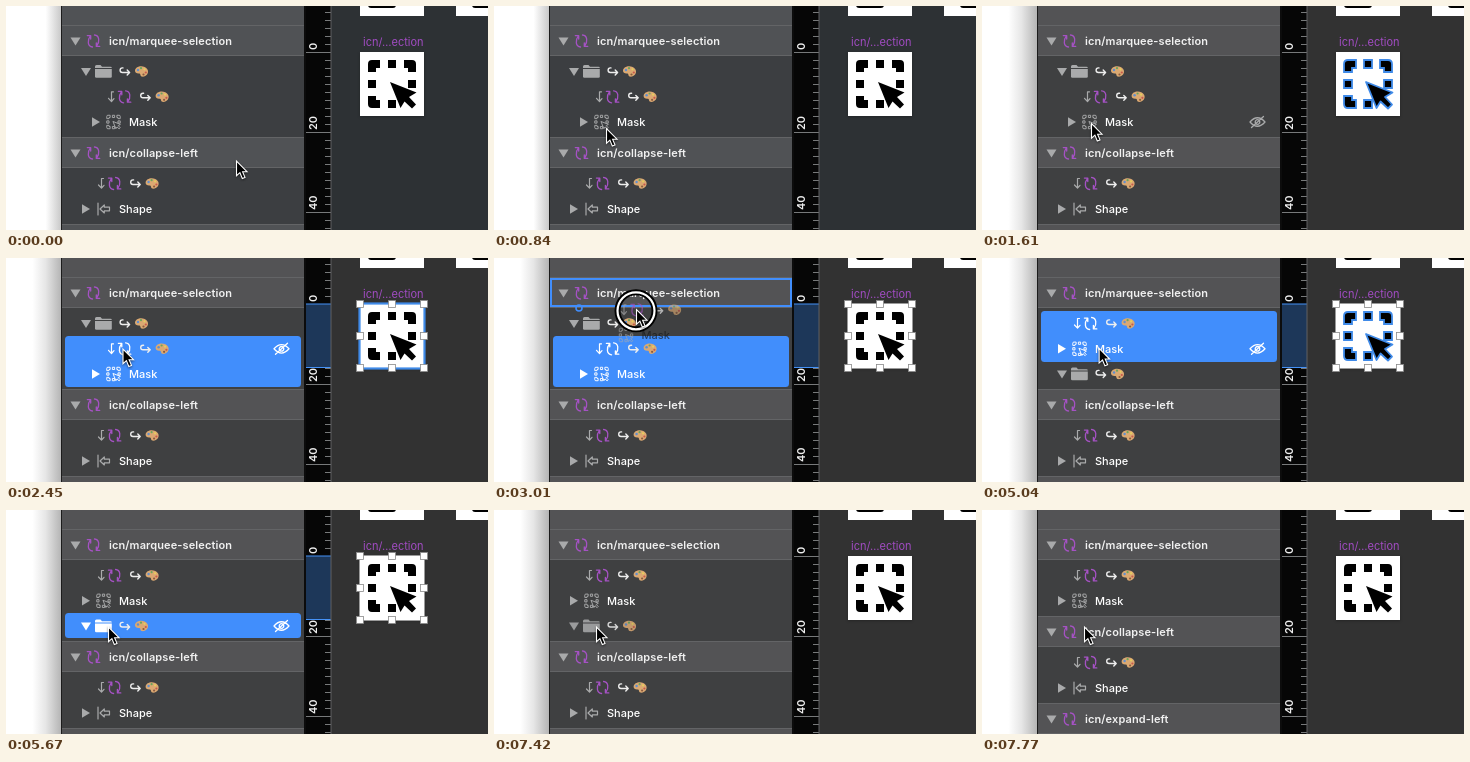
Animation, 482 px wide and 224 px high, one loop 8000 ms. Source, as an HTML page:

```html
<!DOCTYPE html>
<html lang="en">
<head>
<meta charset="utf-8">
<title>Layer list</title>
<style>
html, body { margin: 0; width: 100%; height: 100%; overflow: hidden; background: #fff; }
svg { display: block; width: 482px; height: 224px; font-family: Inter, Roboto, sans-serif; font-size: 11px; }
#stage { --canvas: #2d3134; --panel: #3c3e41; --head: #505255; --tint: #a552c4; --ink: #a9aaab; --text: #fff; }
#stage.active { --canvas: #323232; --panel: #3f4041; --head: #535355; }
#stage .on { --tint: #fff; --ink: #fff; }
.title { font-weight: 600; letter-spacing: .11px; fill: #f1f1f1; }
.name { font-weight: 500; fill: var(--text); }
.line { fill: none; stroke-linecap: round; stroke-linejoin: round; }
#ghost { --text: #16181a; }
</style>
</head>
<body>
<svg id="stage" viewBox="0 0 482 224"></svg>
<script>
const stage = document.getElementById('stage');
const LOOP = 8000, ROW = [65.5, 90.8, 116];

const at = (x, y, body, attrs = '') => `<g transform="translate(${x} ${y})" ${attrs}>${body}</g>`;
const rect = (x, y, w, h, fill, attrs = '') => `<rect x="${x}" y="${y}" width="${w}" height="${h}" fill="${fill}" ${attrs}/>`;
const line = (d, color, width = 1.2, attrs = '') => `<path class="line" d="${d}" stroke="${color}" stroke-width="${width}" ${attrs}/>`;
const range = (n, fn) => Array.from({ length: n }, (_, i) => fn(i)).join('');

// Icons are centred on the origin.
const openMark = '<path d="M-5-3.5H5L0 4.5Z" fill="var(--ink)"/>';
const shutMark = '<path d="M-3.5-4.8V4.8L4.5 0Z" fill="var(--ink)"/>';
const half = 'M-1 6C-6 5.6-6.4-1-3.2-4.8M-6.2-5.4H-2.8V-2';
const sync = line(half, 'var(--tint)', 1.3) + line(half, 'var(--tint)', 1.3, 'transform="rotate(180)"');
const downArrow = line('M2.5-5H.5V4.5M-2.5 1.5L.5 4.7 3 1.8', 'var(--ink)');
const hookArrow = line('M-2-3.6H-2.6A2.2 2.2 0 0 0-2.6 1H4.5M2.2-1.4L4.6 1 2.2 3.4', '#eee', 1.4);
const palette = `<path d="M-6.5-1C-6-6 3-7 6-2 8 2 4 6 0 5 -2 4 0 2-3 2-5 2-6.7 1-6.5-1Z" fill="#dba972"/>
  <circle cx="-3.5" cy="-1.5" r="1.2" fill="#5f8fd0"/><circle cx="-.5" cy="-3.3" r="1.1" fill="#6aa65c"/>
  <circle cx="3" cy="-2.2" r="1.1" fill="#e6cf5c"/><circle cx="4.3" cy="1" r="1.1" fill="#c9584c"/>
  <circle cx="2" cy="3" r="1.1" fill="#8a5a40"/>`;
const folder = `<path d="M-8-5Q-8-6.5-6.5-6.5H-2.5L-1-4.8H7.5Q8.8-4.8 8.8-3.5H-8Z" fill="var(--ink)"/>
  <path d="M-8-2.5H8.8V5Q8.8 6.3 7.5 6.3H-6.7Q-8 6.3-8 5Z" fill="var(--ink)"/>`;
const eye = line('M-7.5 0Q0-8.5 7.5 0Q0 8.5-7.5 0ZM-6 5.5L6-5.5', 'currentColor', 1.3) +
  '<circle r="2.3" fill="none" stroke="currentColor" stroke-width="1.3"/>';
const shape = line('M-5.5-6V6M-3.5 0L.8-4V-1.8H6V1.8H.8V4Z', 'var(--ink)');

// Marquee glyph on a 48 unit square: four corners, a dash per side, an arrow.
const corner = 'M0 12V4Q0 0 4 0H12V8H8V12Z';
const dash = 'M20 0h8v8h-8Z';
const glyph = [0, 90, 180, 270].map(turn =>
  `<path transform="rotate(${turn} 24 24)" d="${turn === 180 ? '' : corner}${dash}"/>`).join('') +
  '<path d="M22 22L48.5 32.5 41 37 48 44.5 44 48.5 36.5 41.5 32.5 48Z" stroke-linejoin="round"/>';
const smallGlyph = `<g transform="scale(.28) translate(-24 -24)" fill="none" stroke="var(--ink)" stroke-width="3.4">${glyph}</g>`;

const styleTag = x => at(x, 0, hookArrow) + at(x + 16.5, 0, palette);
const label = (x, text) => `<text class="name" x="${x}" y="4">${text}</text>`;
const folderRow = at(80, 0, openMark) + at(97, 0, folder) + styleTag(119);
const symbolRow = at(95, 0, downArrow) + at(108.6, 0, sync) + styleTag(129.6);
const maskBody = at(97.5, 0, smallGlyph) + label(113, 'Mask');
const maskRow = at(79.5, 0, shutMark) + maskBody;
const shapeRow = at(79.5, 0, shutMark) + at(97.5, 0, shape) + label(113, 'Shape');
const header = (y, text) => rect(56, y - 16, 242, 31, 'var(--head)') +
  rect(56, y - 16, 242, 1, '#636466') + rect(56, y + 14, 242, 1, '#636466') +
  at(69.5, y, openMark) + at(87.5, y, sync) + `<text class="title" x="103" y="${y + 4}">${text}</text>`;

const tile = rect(354, 46, 64, 64, '#fff', 'filter="drop-shadow(0 1px 1.5px #0004)"');
const handles = [354, 386, 418].map(x => [46, 78, 110].map(y =>
  x === 386 && y === 78 ? '' : rect(x - 3.5, y - 3.5, 7, 7, '#fff', 'stroke="#8b8b8b" stroke-width=".8"')).join('')).join('');

stage.innerHTML = `
<defs>
  <linearGradient id="soft"><stop offset=".72" stop-color="#fff"/><stop offset="1" stop-color="#c9c9c9"/></linearGradient>
  <linearGradient id="deep"><stop offset=".48" stop-color="#fff"/><stop offset=".72" stop-color="#e6e6e6"/><stop offset="1" stop-color="#b5b5b5"/></linearGradient>
  <clipPath id="list"><rect x="56" y="0" width="242" height="224"/></clipPath>
</defs>
<rect id="shade" width="55" height="224"/>
${rect(55, 0, 1, 224, '#1c1c1c')}
${rect(56, 0, 242, 224, 'var(--panel)')}
<g clip-path="url(#list)">
  ${rect(56, 0, 242, 19, 'var(--head)')}
  ${header(35, 'icn/marquee-selection')}
  ${rect(59, 0, 236, 0, '#418efc', 'id="pick" rx="3.5"')}
  <g id="folder">${folderRow}</g><g id="symbol">${symbolRow}</g><g id="mask">${maskRow}</g>
  <g id="eye">${eye}</g>
  <g id="lower">
    ${rect(56, 131, 242, 140, 'var(--panel)')}
    ${header(147, 'icn/collapse-left')}
    ${at(0, 177.5, symbolRow)}${at(0, 203, shapeRow)}
    ${header(234, 'icn/expand-left')}
  </g>
  <g id="drop">${rect(57, 21, 240, 27, 'none', 'stroke="#418efc" stroke-width="2"')}
    <circle cx="85" cy="50" r="3" fill="none" stroke="#418efc" stroke-width="1.6"/></g>
</g>
<g id="ghost" opacity=".65">${at(10, ROW[1], symbolRow)}${at(10, ROW[2], maskBody)}</g>
${rect(298, 0, 2, 224, '#0c0c0c')}
${rect(300, 0, 25, 224, '#060606')}
${range(28, i => rect(i % 10 === 5 ? 300 : 319, 6 + i * 8, i % 10 === 5 ? 25 : 6, 1, '#77797a'))}
<g id="span">${rect(300, 46, 25, 64, '#1d3759')}${rect(300, 45.5, 25, 1, '#4592f7')}${rect(300, 109, 25, 1, '#4592f7')}</g>
${[0, 20, 40].map((n, i) => `<text transform="translate(311 ${44 + i * 80}) rotate(-90)" font-weight="600" fill="#eee">${n}</text>`).join('')}
${rect(325, 0, 157, 224, 'var(--canvas)')}${rect(324.5, 0, 1, 224, '#606162')}
${rect(354, 0, 64, 10, '#fff')}${rect(362, -8, 28, 10, '#000', 'rx="3"')}
${rect(450, 0, 32, 10, '#fff')}${rect(466, -8, 20, 10, '#000', 'rx="3"')}
<text x="357" y="40" fill="#a14cc2">icn/…ection</text>
${tile}
<g id="art" transform="translate(362 54)">${glyph}</g>
${rect(353.5, 45.5, 65, 65, 'none', 'id="frame"')}
<g id="handles">${handles}</g>
<g id="ring" fill="none"><circle r="18.5" stroke="#000" stroke-width="6"/><circle r="18.5" stroke="#fff" stroke-width="2.2"/></g>
<g id="cursor" filter="drop-shadow(0 1px 1px #0008)"><path d="M.5 .5V15.2L3.9 12.1 6.3 18 9 16.9 6.6 11.2H11Z" fill="#000" stroke="#fff" stroke-width="1.1"/></g>`;

const part = Object.fromEntries([...stage.querySelectorAll('[id]')].map(el => [el.id, el]));
const set = (id, attrs) => { for (const k in attrs) part[id].setAttribute(k, attrs[k]); };
const show = (id, on) => set(id, { visibility: on ? 'visible' : 'hidden' });
const move = (id, x, y) => set(id, { transform: `translate(${x} ${y})` });
const mix = (a, b, k) => a + (b - a) * k;
const ease = (t, a, b) => { const k = Math.min(1, Math.max(0, (t - a) / (b - a))); return k * k * (3 - 2 * k); };
const within = (t, a, b) => t >= a && t < b;

// Cursor stops: time, x, y.
const path = [[40, 230, 154.5], [840, 112, 122], [980, 112, 122], [1550, 109, 117], [2030, 109, 117],
  [2330, 116.5, 90.5], [2640, 116.5, 90.5], [3000, 142, 51], [3430, 142, 54], [3520, 141, 56],
  [3640, 141, 56], [4200, 136, 54.5], [4620, 136, 54.5], [5390, 102, 116.5], [LOOP, 102, 116.5]];
function cursorAt(t) {
  if (t <= path[0][0]) return path[0].slice(1);
  const i = path.findIndex(p => p[0] > t), [a, b] = [path[i - 1], path[i]];
  const k = ease(t, a[0], b[0]);
  return [mix(a[1], b[1], k), mix(a[2], b[2], k)];
}

function render(t) {
  const [x, y] = cursorAt(t);
  const active = t >= 1000, dragging = within(t, 2720, 3640), removed = t >= 7420;
  const moved = ease(t, 3630, 3770), shift = ease(t, 7570, 7770);

  stage.classList.toggle('active', active);
  set('shade', { fill: `url(#${active ? 'deep' : 'soft'})` });
  move('cursor', x, y);

  move('folder', 0, mix(ROW[0], ROW[2], moved));
  move('symbol', mix(10, 0, moved), mix(ROW[1], ROW[0], moved));
  move('mask', mix(10, 0, moved), mix(ROW[2], ROW[1], moved));
  set('folder', { opacity: 1 - ease(t, 7400, 7490) });
  move('lower', 0, -25 * shift);

  const maskOn = within(t, 1900, 5500), symbolOn = within(t, 2360, 5500), folderOn = within(t, 5500, 7420);
  part.mask.classList.toggle('on', maskOn);
  part.symbol.classList.toggle('on', symbolOn);
  part.folder.classList.toggle('on', folderOn);
  const top = folderOn || !symbolOn ? 103 : mix(78, 53, moved);
  set('pick', { y: top, height: symbolOn ? 51 : 25 });
  show('pick', maskOn || folderOn);

  const order = moved < .5 ? ['folder', 'symbol', 'mask'] : ['symbol', 'mask', 'folder'];
  const index = Math.floor((y - 53) / 25.2);
  const hover = active && !dragging && !removed ? order[index] : undefined;
  show('eye', hover);
  if (hover) {
    move('eye', 275.5, ROW[index]);
    part.eye.style.color = part[hover].classList.contains('on') ? '#fff' : '#a9aaab';
  }
  set('art', hover === 'mask' ? { stroke: '#3f8ae8', 'stroke-width': 1.8 } : { stroke: 'none' });

  const selected = maskOn || folderOn;
  show('span', selected);
  show('handles', selected);
  show('frame', selected);
  const outlined = hover === 'symbol' && t < 2720;
  set('frame', { stroke: outlined ? '#3f8ae8' : '#9a9a9a', 'stroke-width': outlined ? 2.2 : 1 });

  show('drop', within(t, 2860, 3640));
  show('ghost', dragging);
  move('ghost', x - 117.5, y - 90);

  const pressed = within(t, 1890, 2010) || within(t, 2340, 2440) || within(t, 2660, 3600) || within(t, 5470, 5620);
  show('ring', pressed);
  set('ring', { transform: `translate(${x} ${y + 1.8}) scale(${mix(1, .8, ease(t, 3430, 3520))})` });
}

const start = performance.now();
function tick() {
  render((performance.now() - start) % LOOP);
  requestAnimationFrame(tick);
}
render(0);
requestAnimationFrame(tick);
</script>
</body>
</html>
```
